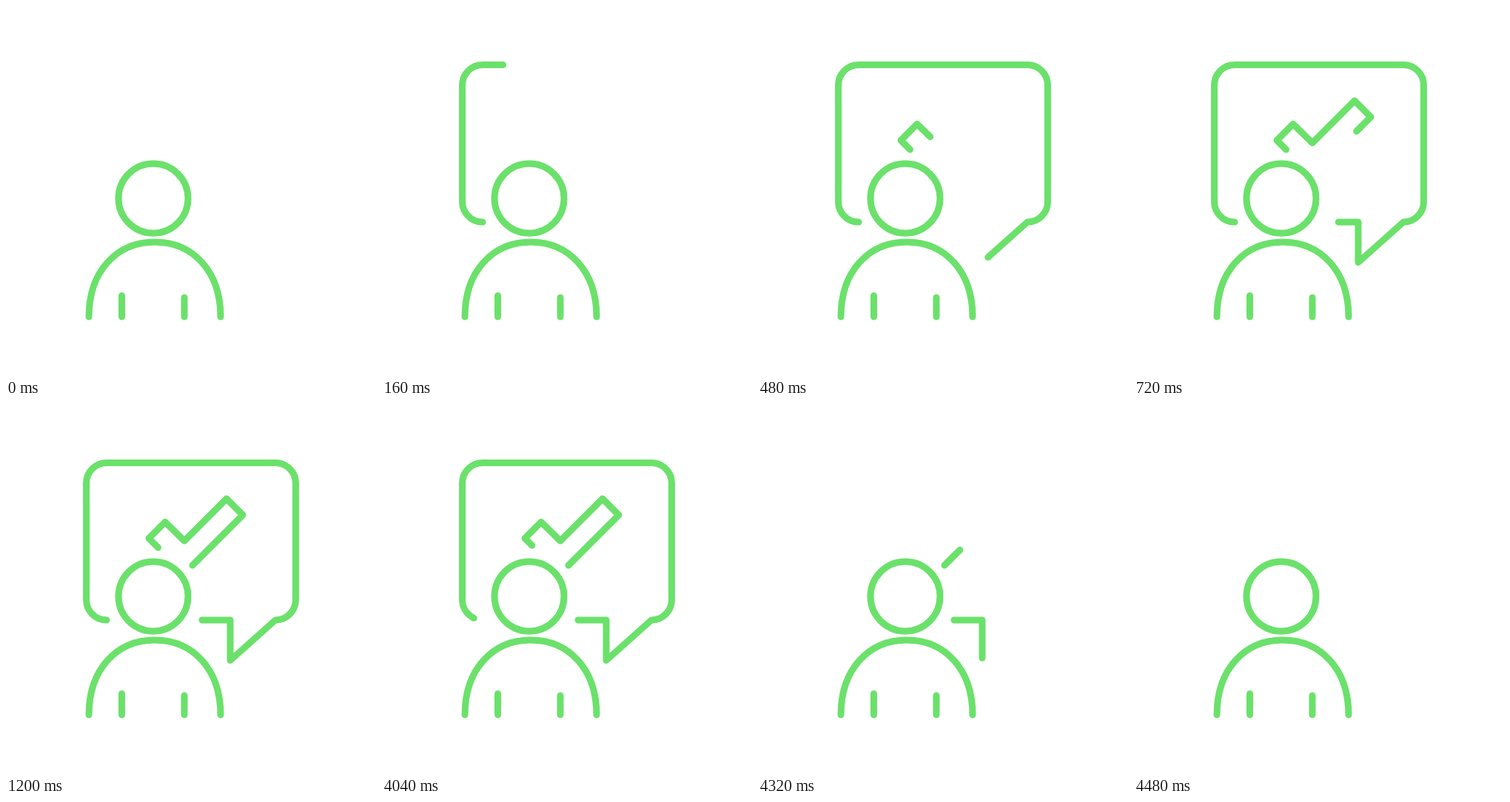
Animation of 500x500 px, one loop 5 s. Source, as an HTML page:

```html
<!DOCTYPE html>
<html lang="en">
<head>
<meta charset="utf-8">
<title>Person with speech bubble</title>
<style>
  html, body { margin: 0; height: 100%; overflow: hidden; background: #fff; }
  svg { display: block; width: 100%; height: 100%; }
  svg * { fill: none; stroke: #6be16b; stroke-width: 9; stroke-linecap: round; stroke-linejoin: round; }
</style>
</head>
<body>
<svg viewBox="0 0 500 500">
  <path id="bubble" pathLength="1" d="M136 292A27.5 27.5 0 0 1 108.5 264.5V107A27.5 27.5 0 0 1 136 79.500H364A27.5 27.5 0 0 1 391.5 107V264.500A27.5 27.5 0 0 1 364 292L303 346.500V292H265"/>
  <path id="check" pathLength="1" d="M205.500 194L193 181.500L215 159.500L241 185L298 128L320 150L252 218"/>
  <circle cx="199" cy="260" r="47"/>
  <path d="M112 420C112 358 150 319 201 319S290 358 290 420M156.500 391.500V420M241 394V420"/>
</svg>
<script>
const LOOP = 5000, STEP = 40;
const bubble = document.getElementById('bubble');
const check = document.getElementById('check');

// Cubic bezier easing with control points (x1, 0) and (x2, 1).
function ease(x, x1, x2) {
  if (x <= 0) return 0;
  if (x >= 1) return 1;
  let lo = 0, hi = 1;
  for (let i = 0; i < 30; i++) {
    const s = (lo + hi) / 2, r = 1 - s;
    if (3 * x1 * s * r * r + 3 * x2 * s * s * r + s ** 3 < x) lo = s;
    else hi = s;
  }
  return lo * lo * (3 - 2 * lo);
}

// Show only the part of the path between two fractions of its length.
function trim(path, from, to) {
  path.style.visibility = to - from > 0.0005 ? 'visible' : 'hidden';
  path.style.strokeDasharray = `${Math.max(0, to - from)} 2`;
  path.style.strokeDashoffset = -from;
}

function draw(now) {
  const t = Math.floor(now % LOOP / STEP) * STEP;
  const erased = ease((t - 4000) / 480, 0.44, 0.28);
  trim(bubble, erased, ease(t / 864, 0.25, 0.1));
  trim(check, erased, ease((t - 200) / 1000, 0.43, 0.25));
}

const start = performance.now();
function tick() {
  draw(performance.now() - start);
  requestAnimationFrame(tick);
}
tick();
</script>
</body>
</html>
```
